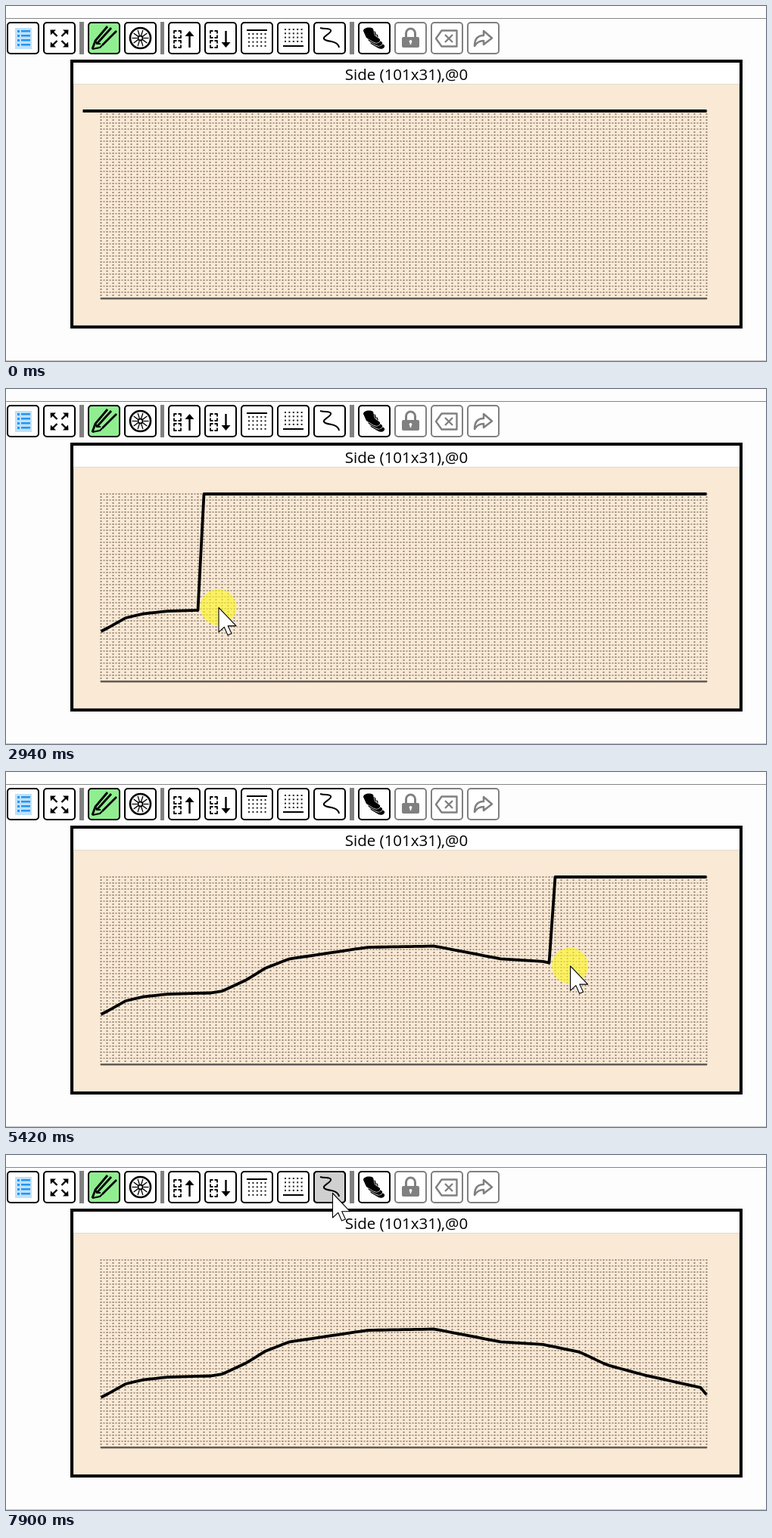
Recreate the animation shown at these times as an HTML page with a canvas. Size 1004x470 px, loop 8000 ms.

```html
<!DOCTYPE html>
<html lang="en">
<head>
<meta charset="utf-8">
<title>Side profile editor</title>
<style>
html, body { margin: 0; width: 1004px; height: 470px; overflow: hidden; background: #fdfdfd; }
canvas { display: block; }
</style>
</head>
<body>
<canvas id="stage" width="1004" height="470"></canvas>
<script>
const W = 1004, H = 470, LOOP = 8000;
const LEFT = 125.5, TOP = 139, CELL = 8, COLS = 101, ROWS = 31;
const FIRST = 130, STEP = 77.6;
const PRESS = 1210, DRAG = 1900, RELEASE = 7270;
const GRAY = '#808080';
const view = document.getElementById('stage').getContext('2d');
const base = document.createElement('canvas');
base.width = W;
base.height = H;
let g = base.getContext('2d');

function box(x, y, w, h, color) {
  g.fillStyle = color;
  g.fillRect(x, y, w, h);
}

function stroke(d, width = 2, color = '#000') {
  g.strokeStyle = color;
  g.lineWidth = width;
  g.stroke(new Path2D(d));
}

function fill(d, color = '#000') {
  g.fillStyle = color;
  g.fill(new Path2D(d));
}

function disc(x, y, r, color) {
  g.fillStyle = color;
  g.beginPath();
  g.arc(x, y, r, 0, 7);
  g.fill();
}

function ring(x, y, r, width) {
  g.lineWidth = width;
  g.strokeStyle = '#000';
  g.beginPath();
  g.arc(x, y, r, 0, 7);
  g.stroke();
}

function button(x, back = '#fff', edge = '#000') {
  g.beginPath();
  g.roundRect(x + 1, 22, 41, 41, 4);
  g.fillStyle = back;
  g.fill();
  g.strokeStyle = edge;
  g.lineWidth = 2;
  g.stroke();
}

// Icons are drawn relative to the top left corner of their button.
function listIcon() {
  box(11, 8, 22, 28, '#bfe1fb');
  for (let y = 11; y < 34; y += 6) {
    box(14, y, 3, 3, '#2196f3');
    box(19, y, 12, 2.5, '#2196f3');
  }
}

function expandIcon() {
  for (const sx of [-1, 1])
    for (const sy of [-1, 1]) {
      g.save();
      g.translate(21.5, 22);
      g.scale(sx, sy);
      stroke('M3 3L9 9', 2.4);
      fill('M12 11.5L11.5 4.5L4.5 11.5Z');
      g.restore();
    }
}

function pencilIcon() {
  stroke('M6 36L10 25L26 6M12 29L31 8M19 31L38 12', 2.8);
  stroke('M6 36L16 34L19 31M10 25L12 29L17 29', 2.2);
}

function wheelIcon() {
  ring(21.5, 21.5, 13.5, 2.6);
  ring(21.5, 21.5, 3, 1.8);
  for (let i = 0; i < 10; i++) {
    const a = i * Math.PI / 5, c = Math.cos(a), s = Math.sin(a);
    stroke(`M${21.5 + 4 * c} ${21.5 + 4 * s}L${21.5 + 11 * c} ${21.5 + 11 * s}`, 1.3);
  }
}

function shiftIcon(up) {
  g.setLineDash([7, 2]);
  g.lineDashOffset = 3.5;
  stroke('M8 12h9v9h-9zM8 25h9v9h-9z', 1.8);
  g.setLineDash([]);
  stroke(up ? 'M28.5 15V34' : 'M28.5 12V31', 2.4);
  fill(up ? 'M22.5 19H34.5L28.5 12Z' : 'M22.5 27H34.5L28.5 34Z');
}

function dotsIcon(top) {
  box(8, top ? 10 : 31, 27, 2, '#000');
  for (let i = 0; i < 5; i++)
    for (let j = 0; j < 4; j++) box(10 + i * 5.4, (top ? 15 : 9) + j * 5.3, 2, 2, '#222');
}

function swirlIcon() {
  stroke('M9 8C16 10 21 8 23 11S15 18 14 21S18 25 24 26S33 29 34 34', 2);
}

function stackIcon() {
  const boot = 'M0 4C0 0 8 -2 13 1L15 10L22 15C23 19 18 21 14 19L4 13Z';
  for (let i = 0; i < 3; i++) {
    g.save();
    g.translate(13 - 3 * i, 16 - 4 * i);
    stroke(boot, 1.3, '#fff');
    fill(boot);
    g.restore();
  }
}

function lockIcon() {
  stroke('M15.5 21V15a6 6 0 0 1 12 0V21', 3, GRAY);
  g.beginPath();
  g.roundRect(10, 20, 23, 14, 2);
  g.fillStyle = GRAY;
  g.fill();
  disc(21.5, 26, 1.9, '#fff');
  box(20.7, 26, 1.6, 4, '#fff');
}

function eraseIcon() {
  stroke('M7 22L14.5 11.5H34.5V32.5H14.5Z', 2.4, GRAY);
  stroke('M19 17L29 27M29 17L19 27', 2.4, GRAY);
}

function shareIcon() {
  stroke('M10 32C10 22 14 18 22 18V12L33 21.5L22 30V25C16 25 13 27 10 32Z', 2.5, GRAY);
}

const groups = [
  [1, [listIcon, expandIcon]],
  [108, [pencilIcon, wheelIcon]],
  [214, [() => shiftIcon(true), () => shiftIcon(false),
    () => dotsIcon(true), () => dotsIcon(false), swirlIcon]],
  [465, [stackIcon, lockIcon, eraseIcon, shareIcon]]
];

function tool(x, icon, back, edge) {
  button(x, back, edge);
  g.save();
  g.translate(x, 21);
  icon();
  g.restore();
}

function drawBase() {
  g.lineJoin = 'round';
  box(0, 0, W, H, '#fdfdfd');
  box(0, 16, W, 1, '#858585');
  box(0, 469, W, 1, '#c4c4c4');
  for (const [x, w] of [[97, 6], [204, 5], [454, 6]]) box(x, 21, w, 43, GRAY);
  for (const [x, icons] of groups)
    icons.forEach((icon, i) => tool(x + i * 48, icon,
      icon === pencilIcon ? '#90ee90' : '#fff',
      x > 460 && i > 0 ? GRAY : '#000'));

  box(85, 71, 888, 356, '#000');
  box(89, 75, 880, 348, '#e3d9cc');
  box(89, 75, 880, 28, '#fff');
  box(90, 104, 878, 318, '#f9e9d5');
  g.fillStyle = '#000';
  g.font = '20.5px "Open Sans", "Noto Sans", sans-serif';
  g.textAlign = 'center';
  g.fillText('Side (101x31),@0', 529, 98);

  // Dotted lines along every cell edge.
  for (let i = 0; i <= 2 * (COLS - 1); i++)
    for (let j = 0; j <= 2 * ROWS; j++)
      if (!(i & j & 1))
        box(LEFT - 1 + i * 4, TOP - 1 + j * 4, 2, 2, `rgba(55,42,34,${i & 1 ? 0.4 : 0.5})`);
  box(125, TOP + ROWS * CELL - 1, 801, 2.5, '#625c57');
}

// Key points of the drawn profile, and of the pointer's x over time.
const profile = [
  [126, 321], [158, 303], [182, 297.5], [214, 294], [270, 292.5], [286, 290],
  [318, 275], [342, 260], [374, 247.5], [478, 232], [566, 230.5], [654, 247.5],
  [710, 251], [758, 261], [794, 278], [846, 292], [918, 308], [926, 318]
];
const drag = [[DRAG, 126], [2303, 191], [3544, 370], [3870, 419], [4630, 597.5],
  [5580, 778], [6260, 865], [7130, 939]];

function lerp(points, x) {
  if (x <= points[0][0]) return points[0][1];
  for (let i = 1; i < points.length; i++) {
    const [x0, y0] = points[i - 1], [x1, y1] = points[i];
    if (x <= x1) return y0 + (y1 - y0) * (x - x0) / (x1 - x0);
  }
  return points[points.length - 1][1];
}

function ease(t, from, to) {
  const p = Math.max(0, Math.min(1, (t - from) / (to - from)));
  return p * p * (3 - 2 * p);
}

function pointer(t) {
  if (t <= 450) {
    const p = Math.min(1, (t - FIRST) / 310);
    return [487 - 414 * p, 416 - 83 * p];
  }
  if (t < DRAG) {
    const p = ease(t, 530, 990), rise = ease(t, 1370, DRAG);
    return [73 + 45 * p + 8 * rise, 333 + 18 * p - 32 * rise];
  }
  if (t < RELEASE) {
    const x = lerp(drag, t);
    return [x, lerp(profile, x) - 2];
  }
  const p = ease(t, 7300, 7860);
  return [946 - 515 * p, 317 - 267 * p];
}

// The line trails the pointer and catches up as the drag ends.
function lastColumn(t) {
  const p = Math.max(0, Math.min(1, (t - DRAG) / (6800 - DRAG)));
  const x = lerp(drag, t) - 27 * (1 - p ** 4);
  return Math.min(COLS - 1, Math.floor((x - LEFT) / CELL));
}

function drawLine(t) {
  const last = lastColumn(t);
  g.beginPath();
  for (let c = 0; c <= last; c++) {
    const x = LEFT + c * CELL;
    g.lineTo(x, lerp(profile, x));
  }
  if (last < COLS - 1) {
    g.lineTo(LEFT + (last + 1) * CELL, TOP);
    g.lineTo(LEFT + (COLS - 1) * CELL, TOP);
  }
  g.lineWidth = 3.8;
  g.strokeStyle = '#000';
  g.stroke();
}

function drawPointer(x, y) {
  const arrow = 'M.5 .5V33L7.8 26.3L12.5 37L17.5 35L12.7 24.8H23.5Z';
  g.save();
  g.translate(x, y);
  fill(arrow, '#fff');
  stroke(arrow, 1.1);
  g.restore();
}

function render(time) {
  const now = time % LOOP;
  const t = FIRST + Math.floor((now - FIRST) / STEP) * STEP;
  g.drawImage(base, 0, 0);
  drawLine(t);
  if (t < FIRST) return;
  const [x, y] = pointer(t);
  if (x > 406 && x < 449 && y < 64) tool(406, swirlIcon, '#d0d0d0');
  if (t >= PRESS && t < RELEASE) disc(x, y, 24, 'rgba(255,247,30,.62)');
  drawPointer(x, y);
}

drawBase();
g = view;
g.lineJoin = 'round';
const start = performance.now();
function tick() {
  render(performance.now() - start);
  requestAnimationFrame(tick);
}
tick();
</script>
</body>
</html>
```
